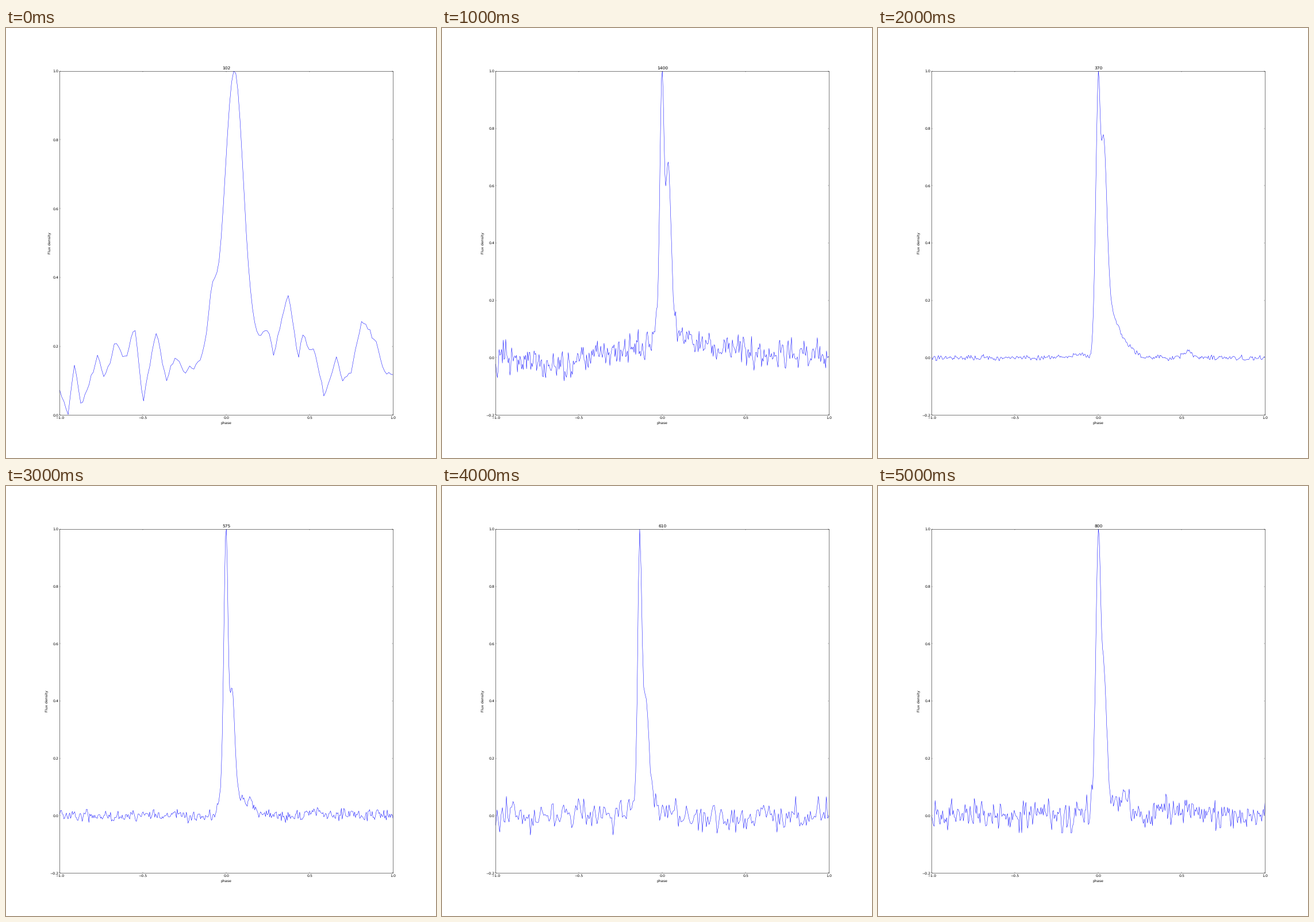
Recreate the animation shown at these times as a matplotlib script. Size 748 px wide and 748 px high, loop 6 s.

```python
import numpy as np
import matplotlib.pyplot as plt
from matplotlib.animation import FuncAnimation

SIZE = 748
INCHES = 20

plt.rcParams.update({
    "font.family": "DejaVu Sans",
    "font.size": 12,
    "text.hinting": "none",
    "axes.titlesize": 14.4,
    "axes.titlepad": 5,
    "axes.labelpad": 5,
    "axes.linewidth": 1,
    "lines.linewidth": 1,
    "xtick.direction": "in", "ytick.direction": "in",
    "xtick.top": True, "ytick.right": True,
    "xtick.major.size": 4, "ytick.major.size": 4,
    "xtick.major.width": 0.5, "ytick.major.width": 0.5,
    "xtick.major.pad": 4, "ytick.major.pad": 4,
})


def hump(x, height, centre, left, right):
    """Bell curve with a different width on each side."""
    width = np.where(x < centre, left, right)
    return height * np.exp(-0.5 * ((x - centre) / width) ** 2)


def profile(n, spread, seed, humps, floor=((0, 0),)):
    """Sum of humps on a floor, peak scaled to 1, with noise off the pulse."""
    x = np.linspace(-1, 1, n)
    y = np.interp(x, *zip(*floor)) + sum(hump(x, *h) for h in humps)
    y /= y.max()
    raw = np.random.default_rng(seed).normal(size=n + 1)
    jitter = np.clip(raw[1:] + 0.3 * raw[:-1], -2.5, 2.5)
    return x, y + spread * jitter * (1 - y) ** 2


# Key turning points of the uneven level around the widest pulse.
FLOOR = [(-1, .08), (-.95, 0), (-.91, .15), (-.87, .03), (-.77, .18),
         (-.73, .11), (-.67, .21), (-.6, .17), (-.55, .26), (-.5, .04),
         (-.42, .25), (-.36, .1), (-.31, .18), (-.25, .13), (-.14, .17),
         (.2, .22), (.25, .25), (.285, .18), (.37, .36), (.43, .17),
         (.46, .24), (.5, .18), (.52, .21), (.585, .06), (.66, .18),
         (.7, .1), (.75, .13), (.81, .28), (.9, .22), (.95, .12), (1, .12)]

# Title, lower limit, curve; each hump is height, centre, left and right width.
SCANS = [
    ("102", 0, profile(160, .008, 10, [
        (.82, .048, .058, .053), (.15, -.085, .025, .025)], FLOOR)),
    ("1400", -.2, profile(401, .027, 14, [
        (.9, -.002, .0128, .0128), (.57, .035, .013, .017),
        (.08, 0, .05, .1), (.04, 0, .3, .4), (-.03, -.65, .15, .15)])),
    ("370", -.2, profile(401, .0045, 37, [
        (.67, -.001, .016, .0103), (.56, .031, .0172, .0197),
        (.22, 0, .015, .1), (.012, -.1, .05, .04), (.02, .53, .03, .03)])),
    ("575", -.2, profile(401, .0105, 57, [
        (.87, -.002, .0132, .011), (.34, .0345, .0155, .0155),
        (.1, 0, .035, .09), (.03, .153, .02, .015), (.02, .55, .02, .02)])),
    ("610", -.2, profile(251, .027, 61, [
        (.9, -.137, .0105, .0135), (.33, -.097, .0172, .018),
        (.06, -.13, .05, .09)])),
    ("800", -.2, profile(401, .024, 80, [
        (.9, 0, .0148, .0134), (.42, .034, .0152, .0152),
        (.08, 0, .04, .11), (.05, .163, .015, .02), (.02, .45, .1, .1)])),
]

fig = plt.figure(figsize=(INCHES, INCHES), dpi=SIZE / INCHES, facecolor="white")
# The left edge stays just under half a pixel so that it snaps outwards.
ax = fig.add_axes([0.12499, 0.1, 0.77501, 0.8])
line, = ax.plot([], [], color="#0000ff")
ax.set_xlabel("phase")
ax.set_ylabel("Flux density")
ax.set_xticks(np.arange(-2, 3) / 2)
ax.set_xlim(-1, 1)


def draw(i):
    name, low, (x, y) = SCANS[i]
    line.set_data(x, y)
    ax.set_title(name)
    ax.set_yticks(np.arange(round(low * 5), 6) / 5)
    ax.set_ylim(low, 1)
    return line,


anim = FuncAnimation(fig, draw, frames=len(SCANS), init_func=lambda: draw(0),
                     interval=1000, repeat=True, repeat_delay=0, blit=False)
plt.show()
```
